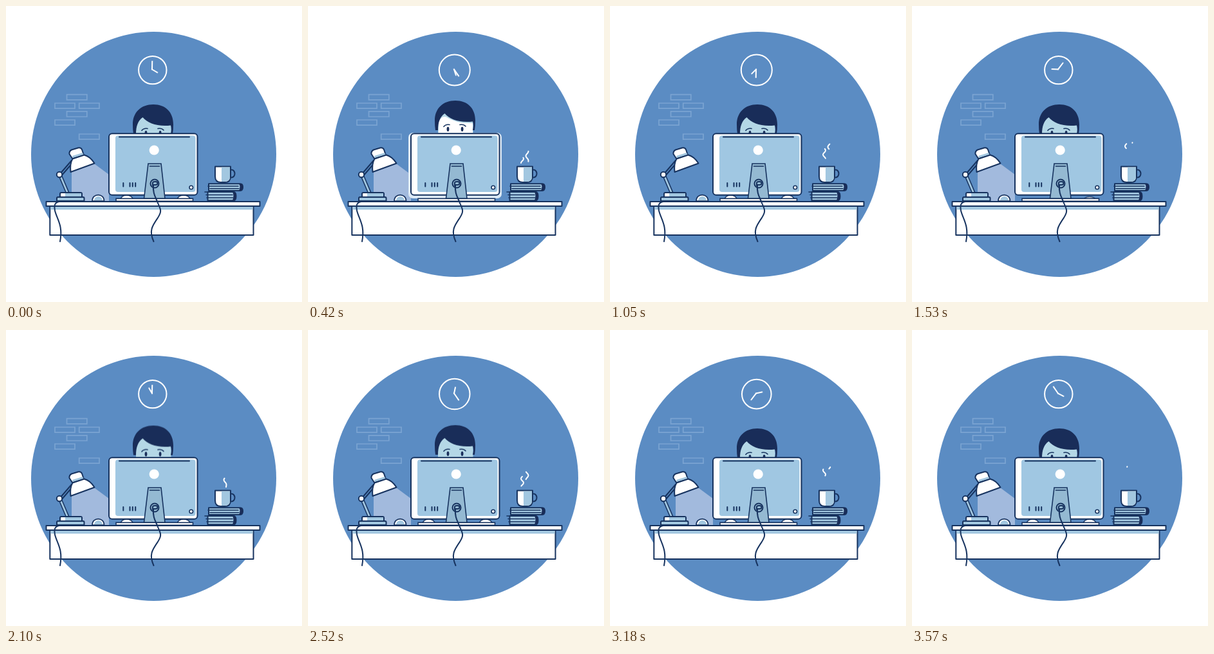
Write an HTML page that moves like this. It is 460 by 460 pixels and loops after 3600 ms.

```html
<!DOCTYPE html>
<html lang="en">
<head>
<meta charset="utf-8">
<title>Desk at work</title>
<style>
  html, body { margin: 0; width: 100%; height: 100%; overflow: hidden; background: #fff; }
  svg { display: block; width: 100vw; height: 100vh; }

  .ink { stroke: #17335f; stroke-width: 2; stroke-linejoin: round; stroke-linecap: round; }
  .thin { stroke: #17335f; stroke-width: 1.6; stroke-linecap: round; }
  .white { fill: #fff; }
  .blue { fill: #a2c7e0; }
  .none { fill: none; }
  .hair { fill: #192d59; }
  .chalk { fill: none; stroke: #fff; stroke-width: 2; stroke-linecap: round; }
  .bricks { fill: none; stroke: #7ba4d2; stroke-width: 1.7; }

  .minute, .hour { transform-origin: 227px 98.5px; }
  .minute { animation: turn 300ms linear infinite; }
  .hour { transform: rotate(120deg); animation: hour 3600ms linear infinite; }
  @keyframes turn { to { transform: rotate(360deg); } }
  @keyframes hour { from { transform: rotate(120deg); } to { transform: rotate(480deg); } }

  .ring { animation: ring 3600ms ease-in-out infinite; }
  @keyframes ring {
    0%, 8% { r: 21.7px; }
    11.7% { r: 24px; }
    15%, 25% { r: 21.7px; }
    29.2% { r: 24px; }
    33%, 62% { r: 21.7px; }
    67% { r: 28px; }
    72%, 78% { r: 21.7px; }
    80% { r: 23px; }
    83% { r: 25px; }
    92%, 100% { r: 21.7px; }
  }

  .head { animation: peek 3600ms ease-in-out infinite; }
  @keyframes peek {
    0%, 7%, 24%, 53%, 73%, 100% { transform: none; }
    11%, 19%, 61%, 69% { transform: translateY(-6px); }
    58.3% { transform: translateY(-4.5px); }
  }

  .beam { animation: flicker 3600ms step-end infinite; }
  @keyframes flicker {
    0%, 30.4% { opacity: 1; }
    28.4% { opacity: 0; }
  }

  .glow { opacity: 0; animation: glow 3600ms step-end infinite; }
  @keyframes glow {
    0%, 13.4%, 81.6% { opacity: 0; }
    10% { opacity: 1; }
    78.4% { opacity: .75; }
  }
  .open { animation: open 3600ms step-end infinite; }
  .shut { opacity: 0; animation: shut 3600ms step-end infinite; }
  @keyframes open { 0%, 81.6% { opacity: 1; } 78.4% { opacity: 0; } }
  @keyframes shut { 0%, 81.6% { opacity: 0; } 78.4% { opacity: 1; } }

  .tap { animation: tapL 360ms ease-in-out infinite; }
  .tap.right { animation-name: tapR; }
  @keyframes tapL {
    0%, 45%, 100% { transform: none; }
    16%, 27% { transform: translateY(6px); }
  }
  @keyframes tapR {
    0%, 37%, 100% { transform: none; }
    13%, 18% { transform: translateY(6px); }
    25% { transform: translateY(2.5px); }
  }

  .steam { stroke-dasharray: 0 99; }
  .steam.left { animation: steamL 1800ms linear infinite; }
  .steam.right { animation: steamR 1800ms linear infinite; }
  @keyframes steamL {
    0%, 19% { stroke-dasharray: 0 99; stroke-dashoffset: 0; opacity: 0; }
    19.4% { stroke-dasharray: 0 99; stroke-dashoffset: 0; opacity: 1; }
    23.3% { stroke-dasharray: 8 99; stroke-dashoffset: 0; }
    39% { stroke-dasharray: 15 99; stroke-dashoffset: -1; }
    58.3% { stroke-dasharray: 15 99; stroke-dashoffset: -7; }
    85% { stroke-dasharray: 7 99; stroke-dashoffset: -23; }
    98.5% { stroke-dasharray: .4 99; stroke-dashoffset: -31.5; opacity: 1; }
    99%, 100% { stroke-dasharray: 0 99; stroke-dashoffset: -32; opacity: 0; }
  }
  @keyframes steamR {
    0%, 8% { stroke-dasharray: 0 99; stroke-dashoffset: 0; opacity: 0; }
    8.3% { stroke-dasharray: 0 99; stroke-dashoffset: 0; opacity: 1; }
    16.7% { stroke-dasharray: 13 99; stroke-dashoffset: 0; }
    23.3% { stroke-dasharray: 16 99; stroke-dashoffset: -2; }
    58.3% { stroke-dasharray: 8 99; stroke-dashoffset: -21.5; }
    85.5% { stroke-dasharray: .3 99; stroke-dashoffset: -31.5; opacity: 1; }
    87%, 100% { stroke-dasharray: 0 99; stroke-dashoffset: -32; opacity: 0; }
  }
</style>
</head>
<body>
<svg viewBox="0 0 460 460">
  <circle cx="229.5" cy="230.5" r="190.5" fill="#5b8cc3"/>

  <g class="bricks">
    <path d="M94.5 137.7h31.3v8.2h-31.3zM76 151h31v8.2h-31zM113.7 151h31.3v8.2h-31.3zM94.5 163.8h31.3v8.2h-31.3zM76 177h31v8.2h-31zM113.7 199h31.3v8.2h-31.3z"/>
  </g>

  <g class="chalk">
    <circle class="ring" cx="227.8" cy="99.6" r="21.7"/>
    <path class="minute" d="M227 98.5V86"/>
    <path class="hour" d="M227 98.5V89"/>
  </g>

  <path class="beam" fill="#a2badd" d="M102 257L137 245L160 262V303H102Z"/>

  <g class="head">
    <path fill="#b4d7e6" d="M202 212V180Q207 164 230 165Q256 168 256.500 188V212Z"/>
    <path class="glow white" d="M203 212V186Q207 177 214 178Q230 189 256 188V212Z"/>
    <path class="hair" d="M198 199Q197 193 197 184C197 165 210 153 229 153C248 153 260 165 260 184Q260 193 259 199H256Q258 191 256 185.500C236 188 220 182 212.500 173C205 178 202 187 202 199Z"/>
    <g class="open">
      <path class="thin none" d="M211 193.500Q214 189.500 220 190.500M236 190.500Q242 189.500 245 193"/>
      <g class="hair">
        <ellipse cx="217.500" cy="197.300" rx="1.9" ry="3.6"/>
        <ellipse cx="239.600" cy="197.300" rx="1.9" ry="3.6"/>
      </g>
    </g>
    <path class="shut thin none" d="M210 184.500Q214 182 219.500 185.500"/>
  </g>

  <!-- monitor, hands and keyboard -->
  <rect class="glow" x="156" y="197" width="145" height="102" rx="7" fill="#dce9f5"/>
  <path class="tap white thin" d="M177.500 302Q179 294 187.500 294T198 302Z"/>
  <path class="tap right white thin" d="M265.500 302Q267 294 276 294T287 302Z"/>
  <rect class="ink white" x="160" y="198.200" width="137.500" height="95.500" rx="5"/>
  <rect x="170" y="201.500" width="124.500" height="87.500" rx="4" fill="#a0c7e2"/>
  <path class="ink none" d="M176 203.600H285"/>
  <circle class="white" cx="230.200" cy="224" r="7.600"/>
  <path class="ink none" d="M182.300 275V280.500M192.500 275V280.500M196.800 275V280.500M201.200 275V280.500"/>
  <circle class="thin white" cx="287.800" cy="282" r="2.800"/>
  <rect class="thin white" x="171" y="299.300" width="119.500" height="4"/>
  <path class="thin" fill="#94b9d2" d="M221 245H241L247 299H214.500Z"/>
  <path class="thin none" d="M223.500 249H238.500"/>

  <!-- lamp -->
  <path class="ink none" d="M82 263L94 291M86 263L98 291"/>
  <path class="blue" d="M83 264H86L97 290H94Z"/>
  <path class="ink none" d="M83 262L102 240M85.500 264.500L104 243"/>
  <circle class="ink white" cx="83" cy="262" r="4.200"/>
  <path class="ink white" d="M103 237L98.500 230Q98 225.500 102 223.500L112 220.500Q116 219.500 118 223L121 232Z"/>
  <path class="blue" d="M103 233L119 228L120.500 231L104 236Z"/>
  <path class="ink white" d="M103.500 237.500L121.500 231.500Q131 234 137.500 244.500L100.500 258Q99 245 103.500 237.500Z"/>
  <path class="ink white" d="M84 297V292Q84 290 86 290H116Q118 290 118 292V297Z"/>
  <path class="blue" d="M92 291H117V296H92Z"/>
  <path class="ink blue" d="M79 303V298.500Q79 297 80.500 297H120Q121.500 297 121.500 298.500V303Z"/>
  <path class="thin white" d="M134 303C134 290.500 152.500 290.500 152.500 303Z"/>
  <path class="blue" d="M137 302C138 294 149 294 150 302Z"/>

  <!-- books and cup -->
  <g class="ink blue">
    <path d="M313.500 289H354Q357.500 289 357.500 295.500T354 302.300H313.500Z"/>
    <path d="M315 276.300H364Q368 276.300 368 281.500T364 287H315Z"/>
  </g>
  <path class="hair" d="M352 289H355Q358 291 358 295.500T355 302H352Q355 295 352 289ZM362 276H365Q368.500 278 368.500 281.500T365 287H362Q365 281 362 276Z"/>
  <path class="thin none" d="M309 289H354M311 293.500H352M312 298H353M314 280H361M317 283.700H362"/>
  <ellipse class="ink none" cx="350.500" cy="260.500" rx="5" ry="6"/>
  <path class="ink white" d="M325 249.500H349V265Q349 274 340 274H334Q325 274 325 265Z"/>
  <path class="blue" d="M335 250.500H348V265Q348 273 340 273H335Z"/>
  <g class="chalk">
    <path class="steam left" pathLength="32.5" d="M331 244c0-3 4-3.500 4-6.500s-4-3.500-4-6.500 4-3.500 4-6.500-4-3.500-4-6.500 3.500-3.500 3.500-6.500"/>
    <path class="steam right" pathLength="32" d="M342 244Q342.500 242 342.500 240c0-3-4-4-4-7s4-4 4-7-4-4-4-7 4-4 4-7"/>
  </g>

  <!-- desk -->
  <rect class="ink white" x="68.300" y="311" width="316.200" height="45"/>
  <rect class="blue" x="69.300" y="311" width="314.200" height="5.500"/>
  <rect class="ink white" x="62.500" y="304" width="332" height="7"/>

  <!-- cables -->
  <g class="ink none">
    <path d="M90 303.500C76 303 74 308 76 318C79 331 89 341 84 366"/>
    <circle cx="231" cy="276" r="6.500"/>
    <path d="M228 279V275Q228 273 231 273H233Q235.500 273 235.500 275.500T232 278H229C228 291 232 296 235.500 305C240 316 243 318 236 329C227 342 222 349 229.500 366"/>
  </g>
</svg>
</body>
</html>
```
